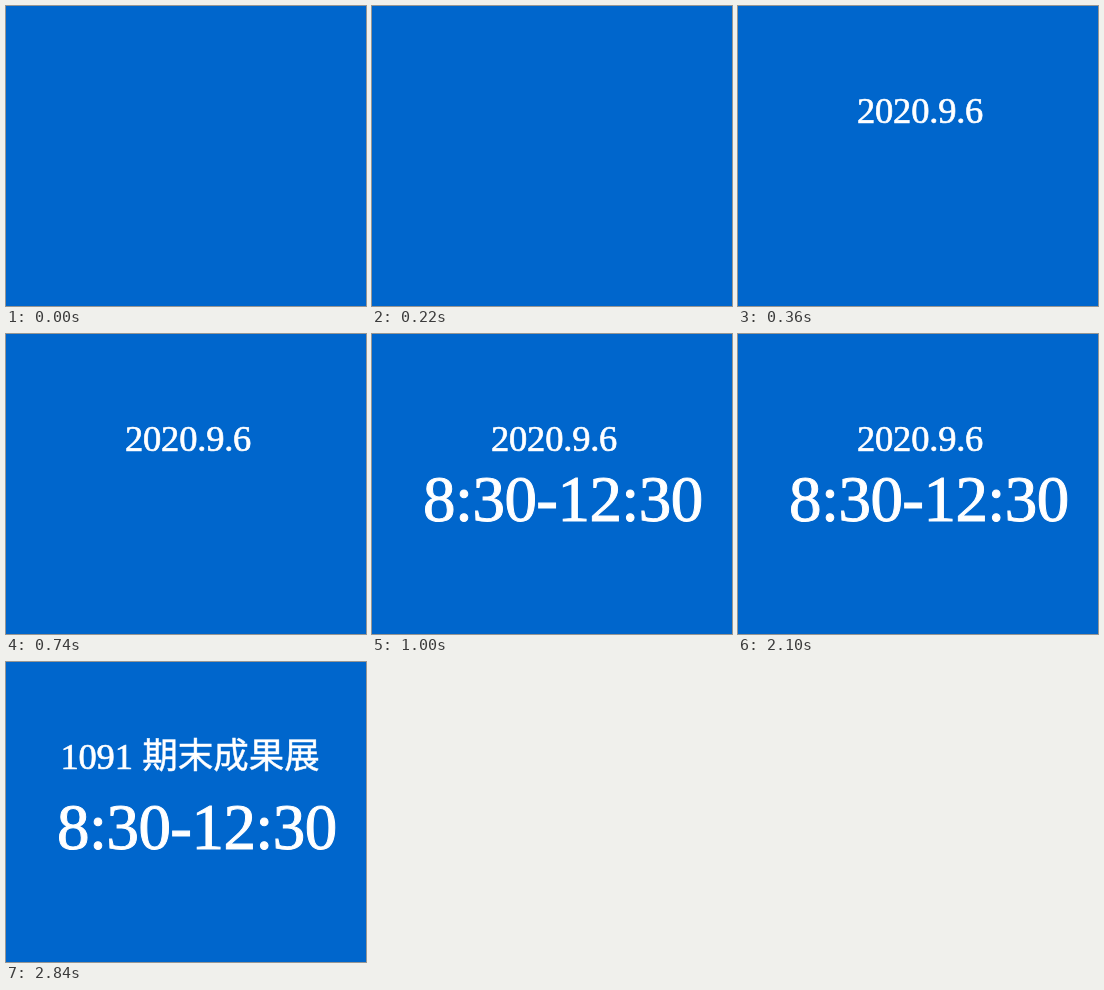
Recreate the animation shown at these times as an HTML page. Size 360 by 300 pixels, loop 2880 ms.

```html
<!DOCTYPE html>
<html lang="zh-Hant">
<head>
<meta charset="utf-8">
<title>Event time</title>
<style>
  html, body { margin: 0; width: 100%; height: 100%; overflow: hidden; background: #06c; }
  svg { display: block; width: 360px; height: 300px; }
  text {
    fill: #fff; stroke: #fff; stroke-width: .7px;
    font: 36.5px "Liberation Serif", "Times New Roman", serif;
    letter-spacing: -.2px;
  }
  .cjk { font: 500 35.5px "Noto Sans CJK TC", "Noto Sans CJK", sans-serif; letter-spacing: 0; stroke-width: .5px; }
  .hours { font-size: 65px; letter-spacing: -.55px; stroke-width: 1px; }
  .date, .hours, .title { animation: 2880ms step-end infinite; opacity: 0; }
  .date { animation-name: date; }
  .hours { animation-name: hours; }
  .title { animation-name: title; }
  /* 360, 1000 and 2840 of 2880 ms */
  @keyframes date { 0% { opacity: 0; } 12.5% { opacity: 1; } 98.6111% { opacity: 0; } }
  @keyframes hours { 0% { opacity: 0; } 34.7222% { opacity: 1; } }
  @keyframes title { 0% { opacity: 0; } 98.6111% { opacity: 1; } }
</style>
</head>
<body>
<svg viewBox="0 0 360 300">
  <text class="date" x="119" y="117.2">2020.9.6</text>
  <text class="hours" x="51" y="186.5">8:30-12:30</text>
  <g class="title">
    <text x="54.5" y="107">1091</text>
    <text class="cjk" x="136.3" y="106.2">期末成果展</text>
  </g>
</svg>
</body>
</html>
```
